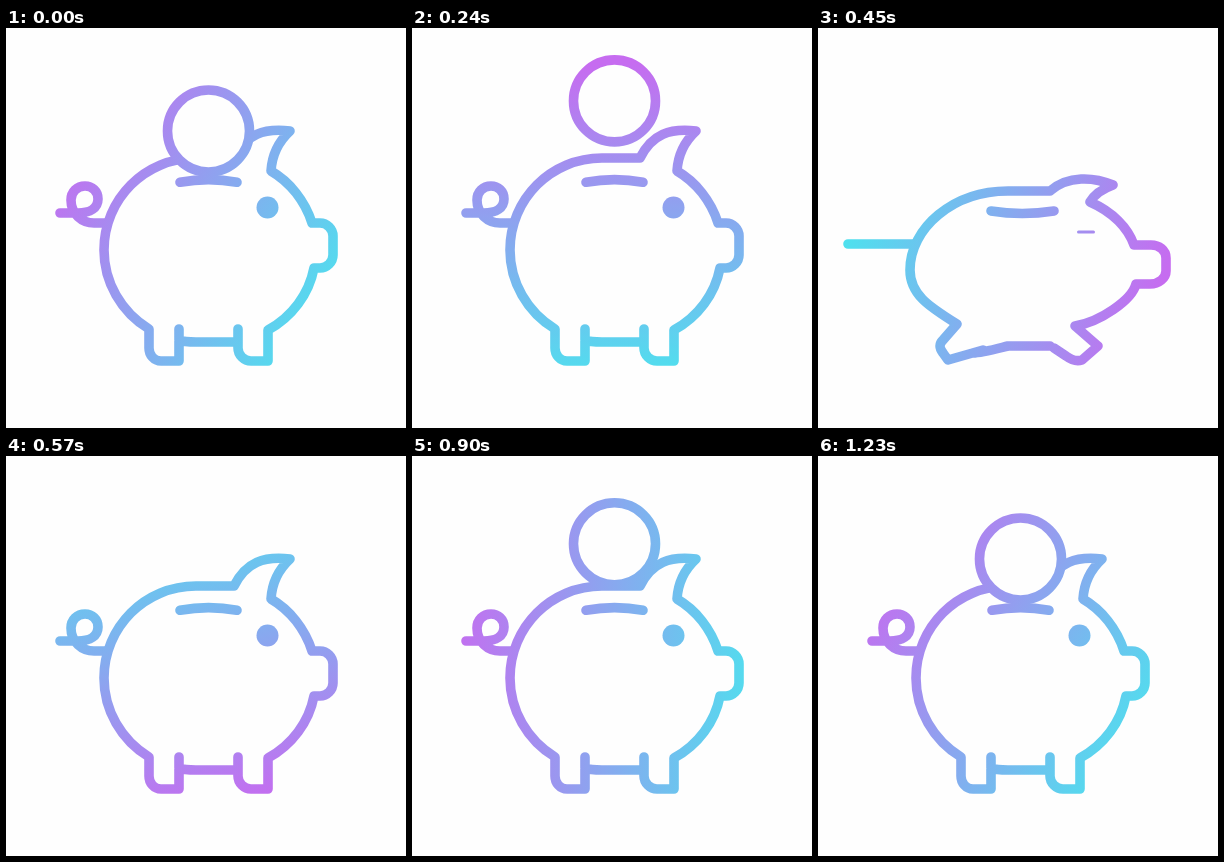
An HTML page for the animation above (3260 ms loop, 400 px wide and 400 px high).

```html
<!DOCTYPE html>
<html lang="en">
<head>
<meta charset="utf-8">
<title>Piggy bank</title>
<style>
  html, body { margin: 0; width: 100%; height: 100%; overflow: hidden; background: #fefefe; }
  svg { display: block; width: 100%; height: 100%; }
  path { fill: none; stroke: url(#tint); stroke-width: 9.6; stroke-linecap: round; stroke-linejoin: round; }
  #coin { fill: #fefefe; }
  #eye { fill: url(#tint); }
</style>
</head>
<body>
<svg viewBox="0 0 400 400">
  <defs>
    <linearGradient id="tint" gradientUnits="userSpaceOnUse">
      <stop offset="0" stop-color="#c66cf0"/>
      <stop offset="1" stop-color="#4de2ee"/>
    </linearGradient>
  </defs>
  <path id="tail"/>
  <path id="body"/>
  <path id="coin"/>
  <path id="slot"/>
  <rect id="eye"/>
</svg>
<script>
const LOOP = 3260, ACTIVE = 1230, STEP = 30;

// Each part: [resting path, squashed path] with matching commands.
const shapes = {
  body: [
    `M228 130 L190 130 C139 130 98 171 98 222 C98 254 115 284 143 301
     L143 320 C143 327 148 333 155 333 L173 333 L173 301
     M173 312 C178 314 184 314 190 314 L232 314
     M232 301 L232 320 C232 327 238 333 245 333 L262 333 L262 302
     C286 289 303 266 308 240 L314 240 C321 240 327 234 327 227
     L327 208 C327 201 321 195 314 195 L306 195 C299 173 284 154 265 143
     C266 127 272 114 284 103 C258 100 240 106 228 130`,
    `M232 163 L190 163 C135 163 92 200 92 242 C92 266 110 278 139 296
     L125 312 C120 317 122 321 125 325 L130 332 L165 322
     M155 325 C164 325 178 321 190 318 L232 318
     M236 320 L248 328 C252 331 258 334 264 332 L280 318 L257 298
     C282 294 314 272 318 256 L332 256 C341 256 348 250 348 243
     L348 230 C348 222 341 217 333 217 L316 217 C310 200 295 184 272 174
     C276 167 284 161 295 157 C276 149 250 147 232 163`
  ],
  tail: [
    `M54 185 L72 185 C84 185 92 180 92 171 C92 163 86 158 79 158
     C71 158 65 164 65 172 C65 186 76 195 88 195 L99 195`,
    `M30 216 L48 216 C70 216 80 216 80 216 C80 216 74 216 66 216
     C58 216 52 216 52 216 C52 216 64 216 80 216 L95 216`
  ],
  slot: ['M174 154.3 Q202.5 149 231 154.3', 'M173 183 Q204 188 236 183']
};

const $ = id => document.getElementById(id);
const lerp = (a, b, k) => a + (b - a) * k;
const clamp = x => Math.min(1, Math.max(0, x));
const smooth = x => { x = clamp(x); return x * x * (3 - 2 * x); };
const span = (t, from, to) => (t - from) / (to - from);
const setAll = (el, attrs) => { for (const k in attrs) el.setAttribute(k, attrs[k]); };

function blend([a, b], k) {
  const to = b.match(/[\d.]+/g);
  let i = 0;
  return a.replace(/[\d.]+/g, n => lerp(+n, +to[i++], k).toFixed(2));
}

// Cubic bezier easing with control points (.3, 0) and (.4, 1).
function spinEase(x) {
  let lo = 0, hi = 1;
  for (let i = 0; i < 24; i++) {
    const s = (lo + hi) / 2, r = 1 - s;
    if (.9 * r * r * s + 1.2 * r * s * s + s * s * s < x) lo = s; else hi = s;
  }
  return lo * lo * (3 - 2 * lo);
}

function coinTop(t) {
  if (t < 120) return lerp(62, 27, smooth(t / 120));
  if (t < 440) return lerp(27, 180, span(t, 120, 450) ** 3.4);
  if (t < 735) return null;
  if (t < 870) return lerp(150, 45, 1 - (1 - span(t, 735, 870)) ** 2);
  return lerp(45, 62, smooth(span(t, 870, 1020)));
}

function coinPath(t, slotY) {
  const top = coinTop(t);
  if (top === null) return '';
  const falling = t < 600 ? smooth(span(t, 250, 330)) : 0;
  const bottom = Math.min(top + 82 + 8 * falling, slotY - 10.3);
  const h = bottom - top;
  if (h < 4) return '';
  const egg = t < 600 ? falling : clamp(1 - h / 82);
  const w = (41 - 1.5 * falling) * Math.min(1, h / 82) ** .7;
  const cx = 202.5, mid = top + h * (.5 - .1 * egg);
  const up = lerp(mid, top, .552), down = lerp(mid, bottom, lerp(.552, .33, egg));
  const a = w * .552, b = w * lerp(.552, .68, egg), l = cx - w, r = cx + w;
  return `M${cx} ${top} C${cx + a} ${top} ${r} ${up} ${r} ${mid}
    C${r} ${down} ${cx + b} ${bottom} ${cx} ${bottom}
    C${cx - b} ${bottom} ${l} ${down} ${l} ${mid}
    C${l} ${up} ${cx - a} ${top} ${cx} ${top}Z`;
}

function draw(t) {
  const squash = t < 450 ? smooth(span(t, 270, 450)) : 1 - smooth(span(t, 450, 570));
  for (const id in shapes) $(id).setAttribute('d', blend(shapes[id], squash));
  $('coin').setAttribute('d', coinPath(t, lerp(154.3, 183, squash)));

  const rx = lerp(11, 9, squash), ry = lerp(11, 1.5, squash);
  setAll($('eye'), {
    x: lerp(261.5, 268, squash) - rx, y: lerp(179.5, 204, squash) - ry,
    width: 2 * rx, height: 2 * ry, rx: Math.min(rx, ry)
  });

  const angle = (211 + 360 * spinEase(t / ACTIVE)) * Math.PI / 180;
  const dx = 160 * Math.cos(angle), dy = 160 * Math.sin(angle);
  setAll($('tint'), { x1: 195 + dx, y1: 197 + dy, x2: 195 - dx, y2: 197 - dy });
}

const start = performance.now();
function tick(now) {
  const t = Math.max(0, now - start) % LOOP;
  draw(Math.min(ACTIVE, Math.floor(t / STEP) * STEP));
  requestAnimationFrame(tick);
}
draw(0);
requestAnimationFrame(tick);
</script>
</body>
</html>
```
